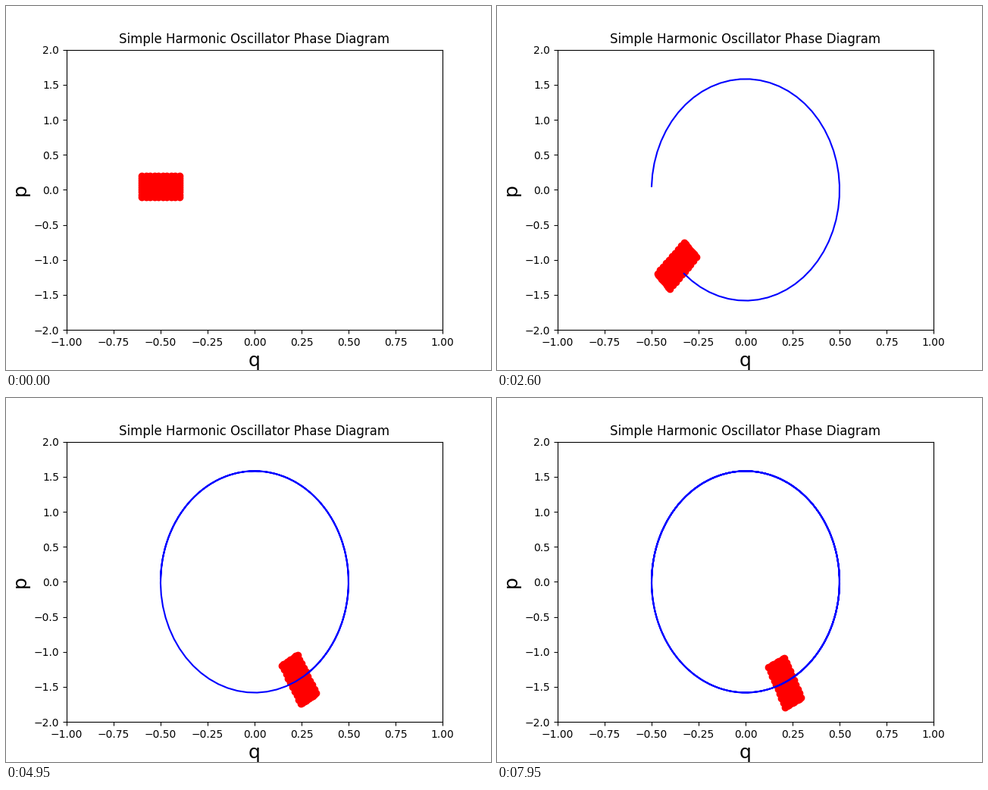
Recreate the animation shown at these times as a matplotlib script. Size 640 by 480 pixels, loop 8 s.

```python
import numpy as np
import matplotlib.pyplot as plt
from matplotlib.animation import FuncAnimation

FRAMES = 160
INTERVAL = 50
OMEGA = np.sqrt(10)
STEP = 10 / 299  # time between frames


def orbit(q0, p0, t):
    """Phase-space position of a unit-mass oscillator at time t."""
    c, s = np.cos(OMEGA * t), np.sin(OMEGA * t)
    return q0 * c + p0 / OMEGA * s, p0 * c - OMEGA * q0 * s


plt.rcParams["font.family"] = "DejaVu Sans"
fig, ax = plt.subplots(figsize=(6.4, 4.8), dpi=100)
ax.set_xlim(-1, 1)
ax.set_ylim(-2, 2)
ax.set_title("Simple Harmonic Oscillator Phase Diagram")
ax.set_xlabel("q", fontsize=18)
ax.set_ylabel("p", fontsize=18)

# a rectangular patch of starting states and the path of its centre
q_grid, p_grid = np.meshgrid(np.linspace(-0.6, -0.4, 10),
                             np.linspace(-0.1, 0.2, 10))
q_path, p_path = orbit(-0.5, 0.05, STEP * np.arange(FRAMES))

cloud, = ax.plot([], [], "ro")
trail, = ax.plot([], [], "b-")


def update(i):
    q, p = orbit(q_grid, p_grid, STEP * i)
    cloud.set_data(q.ravel(), p.ravel())
    trail.set_data(q_path[:i], p_path[:i])
    return cloud, trail


anim = FuncAnimation(fig, update, frames=FRAMES, interval=INTERVAL,
                     repeat=True, repeat_delay=0, blit=False)
plt.show()
```
